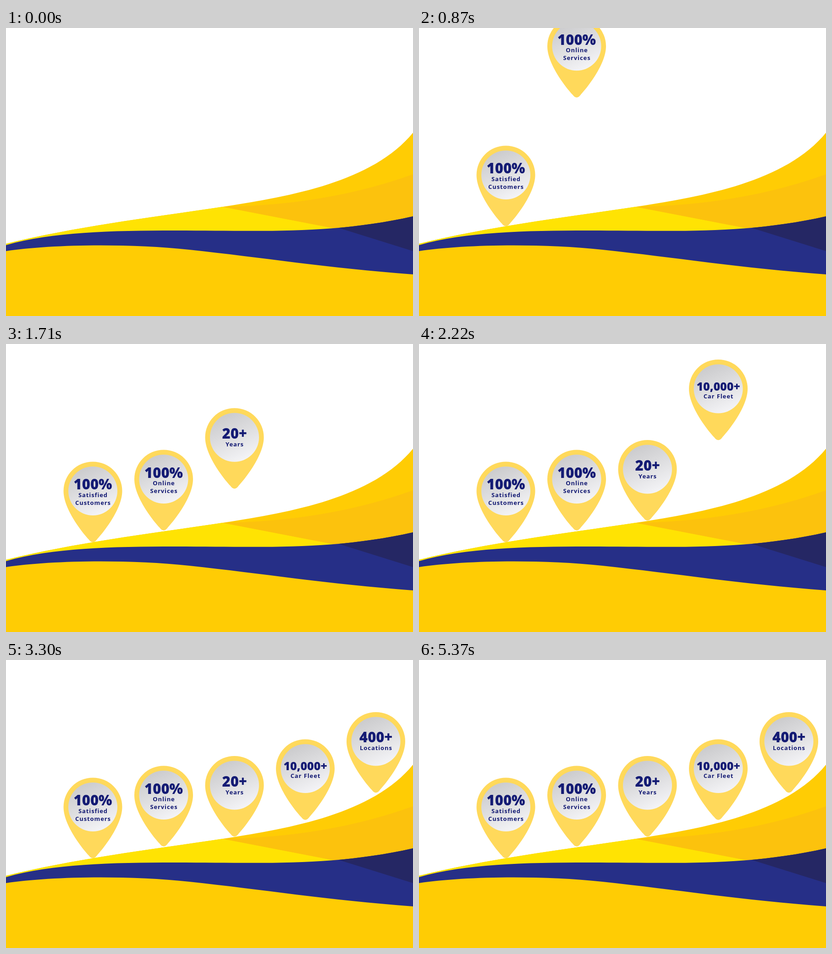
Write an HTML page with a canvas that moves like this. It is 888 px wide and 630 px high and loops after 5400 ms.

```html
<!DOCTYPE html>
<html lang="en">
<head>
<meta charset="utf-8">
<title>Pins on a wave</title>
<style>
  html, body { margin: 0; width: 100%; height: 100%; overflow: hidden; background: #fff; }
  canvas { display: block; width: 888px; height: 630px; }
</style>
</head>
<body>
<canvas id="stage" width="888" height="630"></canvas>
<script>
const ctx = document.getElementById('stage').getContext('2d');
const W = 888, H = 630;
const LOOP = 5400, STEP = 30, DROP_MS = 600, DROP_PX = 465;
const NAVY = '#141b74';

const HILL = 'M0 472 C150 435 300 417 480 390 C620 368 800 337 888 229';
const BAND_TOP = 'M0 475 C100 446 230 443 370 443 C560 443 710 452 888 412';
const BAND_LOW = 'M0 488 C90 474 260 470 400 485 C560 502 700 525 888 539';

const below = edge => new Path2D(edge + ` L${W} ${H} L0 ${H} Z`);
const hill = below(HILL), bandTop = below(BAND_TOP), bandLow = below(BAND_LOW);
const light = new Path2D('M0 380 L472 380 L472 391 L725 440 L725 500 L0 500 Z');
const fold = new Path2D('M472 391 Q700 388 888 320 L888 500 L725 440 Z');
const bandFold = new Path2D('M725 437 L888 400 L888 488 Z');
const pinShape = new Path2D(
  'M-64 0 A64 64 0 0 1 64 0 C64 40 22 92 9 106 Q0 118.5 -9 106 C-22 92 -64 40 -64 0 Z');

// Title and label baselines are relative to the centre of the pin head.
const pins = [
  { x: 189.5, y: 321.5, title: '100%', size: 31, base: -3.5, labels: ['Satisfied', 'Customers'], first: 13.5 },
  { x: 344, y: 295.5, title: '100%', size: 31, base: -2.5, labels: ['Online', 'Services'], first: 13 },
  { x: 498.5, y: 274, title: '20+', size: 31, base: 3, labels: ['Years'], first: 19.5 },
  { x: 653, y: 237.5, title: '10,000+', size: 25, base: 3.5, labels: ['Car Fleet'], first: 20.5 },
  { x: 807, y: 178, title: '400+', size: 31, base: 2, labels: ['Locations'], first: 18.5 }
];

function fill(path, color) {
  ctx.fillStyle = color;
  ctx.fill(path);
}

function clipped(area, draw) {
  ctx.save();
  ctx.clip(area);
  draw();
  ctx.restore();
}

function drawWaves() {
  fill(hill, '#ffcc04');
  clipped(hill, () => {
    fill(light, '#ffe303');
    fill(fold, '#fcc20d');
  });
  fill(bandTop, '#262f87');
  clipped(bandTop, () => fill(bandFold, '#252764'));
  fill(bandLow, '#ffcc04');
}

function write(text, y, weight, size, spacing) {
  ctx.font = `${weight} ${size}px "Open Sans", "Noto Sans", sans-serif`;
  ctx.letterSpacing = spacing + 'px';
  ctx.fillText(text, spacing / 2, y);
}

function drawPin(pin, lift) {
  ctx.save();
  ctx.translate(pin.x, pin.y - lift);
  fill(pinShape, '#ffd95b');

  const shade = ctx.createLinearGradient(-22, -50, 22, 50);
  shade.addColorStop(0, '#cbcbcd');
  shade.addColorStop(0.5, '#dfdfe1');
  shade.addColorStop(1, '#f4f4f7');
  ctx.fillStyle = shade;
  ctx.beginPath();
  ctx.arc(0, 0, 53.5, 0, Math.PI * 2);
  ctx.fill();

  ctx.fillStyle = NAVY;
  ctx.textAlign = 'center';
  write(pin.title, pin.base, 800, pin.size, 0);
  pin.labels.forEach((label, i) => write(label, pin.first + i * 17.2, 700, 13, 0.9));
  ctx.restore();
}

function render(time) {
  ctx.fillStyle = '#fff';
  ctx.fillRect(0, 0, W, H);
  drawWaves();
  pins.forEach((pin, i) => {
    const p = (time - i * DROP_MS) / DROP_MS;
    if (p >= 0) drawPin(pin, DROP_PX * (1 - Math.min(p, 1)));
  });
}

let start;
function tick(now) {
  start ??= now;
  const time = (now - start) % LOOP;
  render(Math.floor(time / STEP) * STEP);
  requestAnimationFrame(tick);
}
requestAnimationFrame(tick);
</script>
</body>
</html>
```
